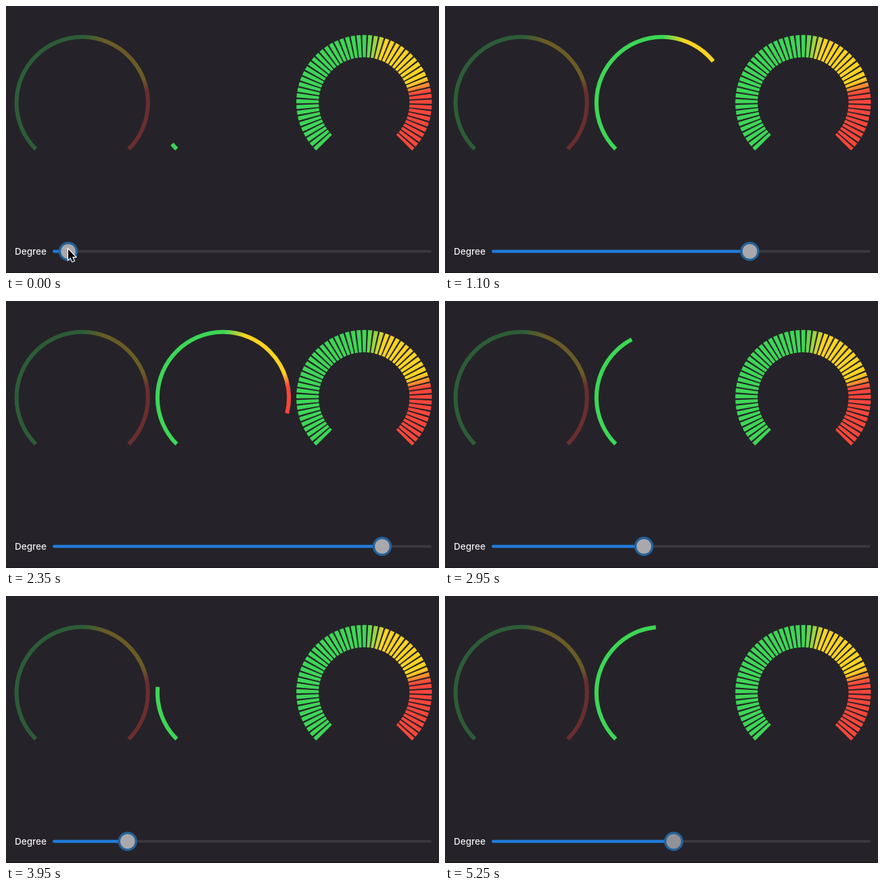
An HTML page with a canvas for the animation above (5.9 s loop, 640 px wide and 395 px high).

```html
<!DOCTYPE html>
<html lang="en">
<head>
<meta charset="utf-8">
<title>Gauge</title>
<style>
  html, body { margin: 0; width: 100%; height: 100%; overflow: hidden; background: #252329; }
  canvas { position: absolute; left: 0; top: 0; width: 640px; height: 395px; }
  #label { position: absolute; left: 13px; top: 354px; font: 500 13.5px/19px Inter, sans-serif; color: #efeef0; }
</style>
</head>
<body>
<canvas id="stage"></canvas>
<div id="label">Degree</div>
<script>
const LOOP = 5900, STEP = 50;
const RAD = Math.PI / 180, START = 135 * RAD, SWEEP = 270 * RAD;
const R = 100, CY = 143, THIN = 6, THICK = 33, BARS = 55;
const TRACK = { x0: 69, x1: 629, y: 363 };
const KNOB = { min: 80, max: 618, rest: 92 };

// drags of the knob: start ms, end ms, x reached; it rests in between
const drags = [
  [200, 600, 320], [600, 1600, 581], [1600, 1700, 618], [1700, 1850, 556],
  [2350, 2950, 294], [2950, 3620, 137], [3620, 4400, 238], [4550, 5200, 338]
];

const canvas = document.getElementById('stage');
const ctx = canvas.getContext('2d');
const ratio = window.devicePixelRatio || 1;
canvas.width = 640 * ratio;
canvas.height = 395 * ratio;
ctx.scale(ratio, ratio);

const progress = (t, a, b) => Math.min(1, Math.max(0, (t - a) / (b - a)));
const knobAt = t => drags.reduce((x, [a, b, to]) => x + (to - x) * progress(t, a, b), KNOB.rest);

function sweepGradient(cx) {
  const g = ctx.createConicGradient(START, cx, CY);
  const stop = (deg, color) => g.addColorStop(deg / 360, color);
  const green = '#3dd656', yellow = '#fdd321', red = '#fa463a';
  stop(136, green);
  stop(155, yellow);
  stop(203, yellow);
  stop(215, red);
  stop(310, red);
  stop(310, green);
  return g;
}

function arc(cx, width, part, alpha = 1, bars = 0) {
  const r = R - width / 2 + 0.15;
  // bars and gaps are 5 : 2, with a bar at both ends
  const unit = r * SWEEP / (bars * 7 - 2);
  ctx.globalAlpha = alpha;
  ctx.strokeStyle = sweepGradient(cx);
  ctx.lineWidth = width;
  ctx.setLineDash(bars ? [5 * unit, 2 * unit] : []);
  ctx.beginPath();
  ctx.arc(cx, CY, r, START, START + SWEEP * part);
  ctx.stroke();
  ctx.setLineDash([]);
  ctx.globalAlpha = 1;
}

function bar(x0, x1, height, color) {
  ctx.fillStyle = color;
  ctx.beginPath();
  ctx.roundRect(x0, TRACK.y - height / 2, x1 - x0, height, height / 2);
  ctx.fill();
}

function disc(x, r, color) {
  ctx.fillStyle = color;
  ctx.beginPath();
  ctx.arc(x, TRACK.y, r, 0, 2 * Math.PI);
  ctx.fill();
}

function pointer(x, y, points) {
  ctx.beginPath();
  points.forEach(([dx, dy]) => ctx.lineTo(x + dx, y + dy));
  ctx.closePath();
  ctx.lineWidth = 2.4;
  ctx.strokeStyle = '#fff';
  ctx.stroke();
  ctx.fillStyle = '#000';
  ctx.fill();
}

const arrow = [[0, 0], [0, 15], [3.4, 11.9], [6, 18], [8.6, 16.9], [6, 11], [10.6, 11]];
const resize = [[0, 0], [6, 6], [-6, 6]];

function draw(t) {
  const x = knobAt(t);
  ctx.fillStyle = '#252329';
  ctx.fillRect(0, 0, 640, 395);
  ctx.fillStyle = '#1f191f';
  ctx.fillRect(0, 393.5, 640, 1.5);

  arc(112.7, THIN, 1, 0.32);
  arc(321, THIN, (x - KNOB.min) / (KNOB.max - KNOB.min));
  arc(529.3, THICK, 1, 1, BARS);

  bar(TRACK.x0, TRACK.x1, 4, '#3a383d');
  bar(TRACK.x0, x, 4.6, '#207bd9');
  disc(x, 14.2, '#24629a');
  disc(x, 10.8, t < 5200 ? '#aaa8ac' : '#939198');

  // the pointer slips off the bottom edge during the first drag
  if (t < 700) {
    const p = progress(t, 200, 600);
    pointer(x + 12 * p, 360 + 30 * p, t < 550 ? arrow : resize);
  }
}

const begin = performance.now();
function tick() {
  const t = (performance.now() - begin) % LOOP;
  draw(Math.floor(t / STEP) * STEP);
  requestAnimationFrame(tick);
}
tick();
</script>
</body>
</html>
```
